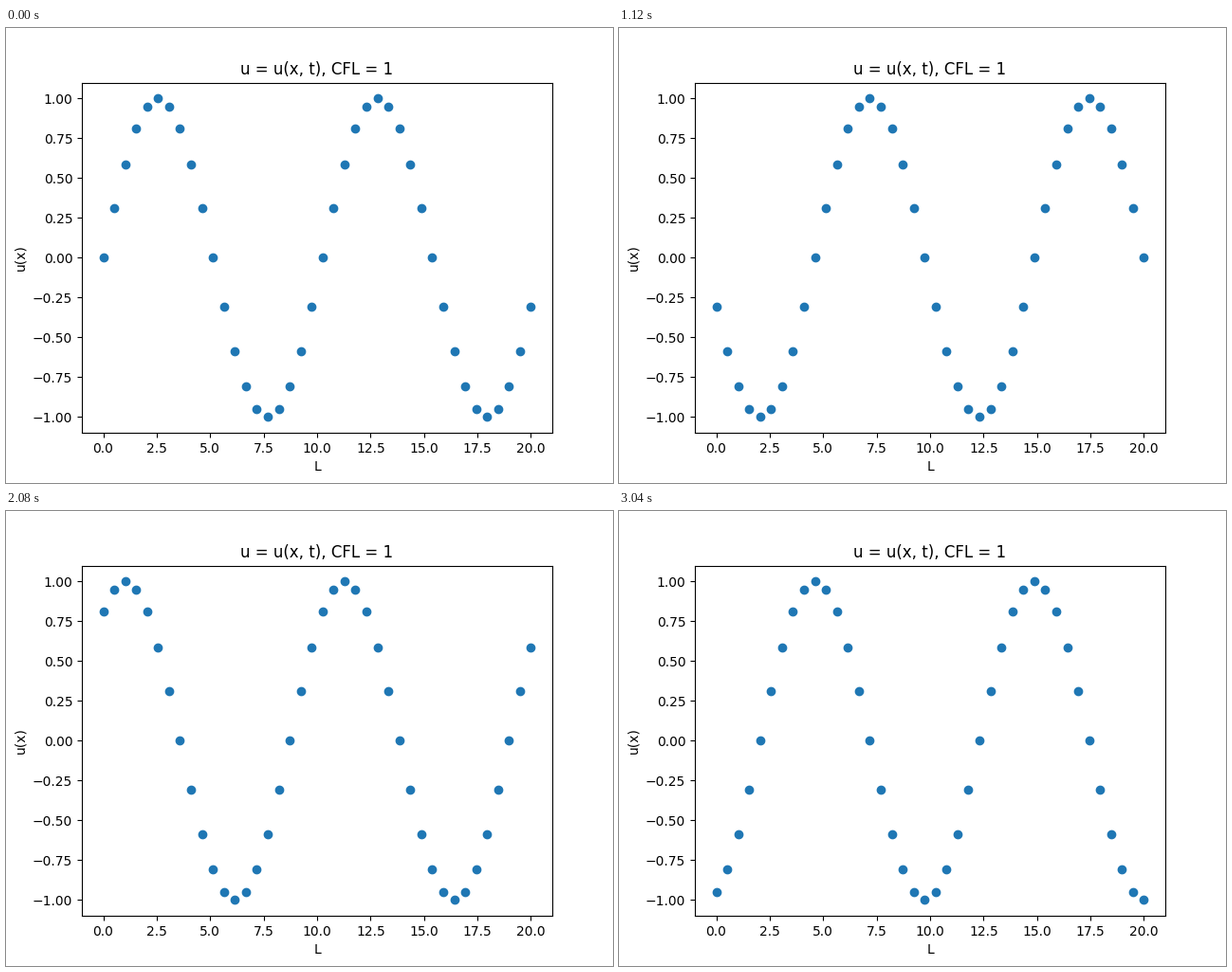
These frames come from a looping animation (640 by 480 pixels, 3.2 s). A matplotlib script:

```python
import math

import matplotlib.pyplot as plt
import numpy as np
from matplotlib.animation import FuncAnimation

LENGTH = 20
POINTS = 40
PERIOD = 20  # grid cells per wavelength
FRAMES = 20
INTERVAL = 160
CELLS_PER_FRAME = 1.25

cells = np.arange(POINTS)
x = np.linspace(0, LENGTH, POINTS)


def wave(frame):
    """Sine wave advected to the right by whole grid cells."""
    shift = math.ceil(CELLS_PER_FRAME * frame)
    return np.sin(2 * np.pi * (cells - shift) / PERIOD)


fig, ax = plt.subplots(figsize=(6.4, 4.8), dpi=100)
dots, = ax.plot(x, wave(0), "o", color="#1f77b4")
ax.set_xlim(-1, 21)
ax.set_ylim(-1.1, 1.1)
ax.set_title("u = u(x, t), CFL = 1")
ax.set_xlabel("L")
ax.set_ylabel("u(x)")


def update(frame):
    dots.set_ydata(wave(frame))
    return dots,


anim = FuncAnimation(fig, update, frames=FRAMES, interval=INTERVAL,
                     repeat=True, repeat_delay=0)
plt.show()
```
